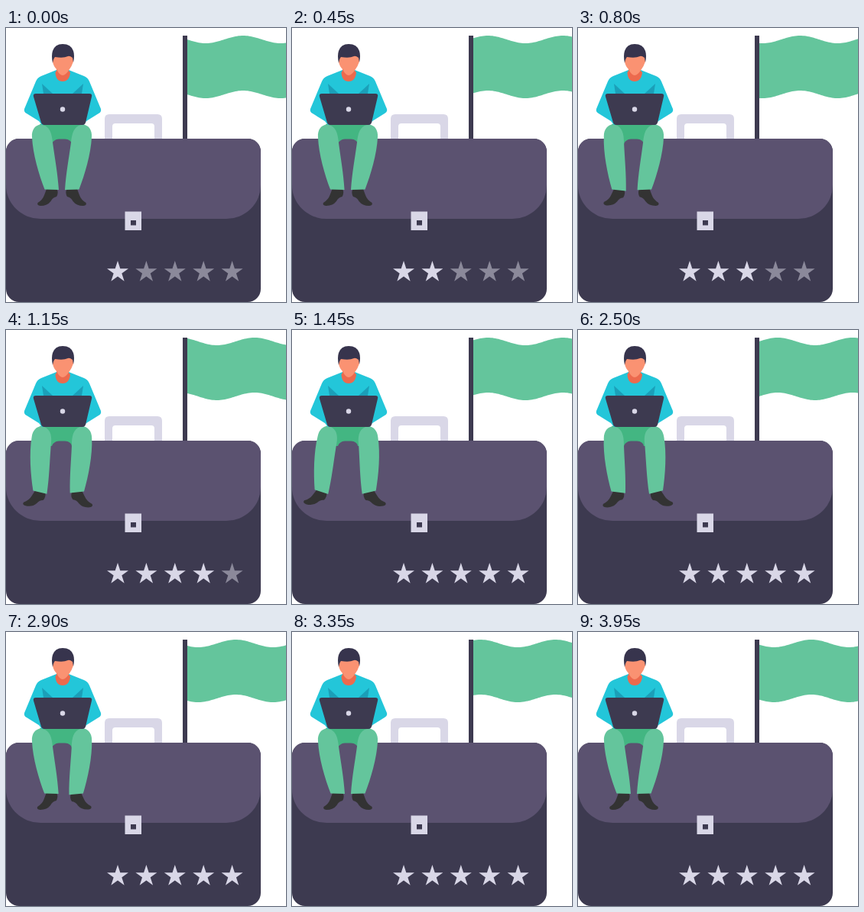
These frames come from a looping animation (366 by 359 pixels, 4000 ms). An HTML page:

```html
<!DOCTYPE html>
<html lang="en">
<head>
<meta charset="utf-8">
<title>Briefcase rating</title>
<style>
  html, body { margin: 0; width: 100%; height: 100%; overflow: hidden; background: #fff; }
  svg { display: block; width: 100vw; height: 100vh; }
  .dark { fill: #3d3a50; }
  .lid { fill: #5b5270; }
  .pale { fill: #d9d7e7; }
  .green { fill: #64c59c; }
  .thigh { fill: #43b682; }
  .shoe { fill: #333; }
  .shirt { fill: #23c6d9; }
  .fold { fill: #1b9fb8; }
  .skin { fill: #fa9272; }
  .neck { fill: #ec6a4e; }
  .hair { fill: #37344d; }
</style>
</head>
<body>
<svg viewBox="0 0 366 359">
  <defs>
    <g id="leg">
      <path class="shoe" d="M53 211H66.500Q69 216 66 221Q61 222 58.500 227Q54 233 45 233Q40 232.500 41.500 229Q48 225 50 219Z"/>
      <path class="green" d="M34 143C33 132 40 125 48 127C57 129 60 138 61 150C64 172 67.500 190 69 212L50.500 211.500C43 192 35 165 34 143Z"/>
    </g>
    <path id="fold" class="fold" d="M47 73L61 86H49Z"/>
  </defs>

  <path id="flag" class="green"/>
  <path class="dark" d="M231 10H237V146H231Z"/>
  <path class="pale" fill-rule="evenodd" d="M129 145V119Q129 113 135 113H198Q204 113 204 119V145H194V129Q194 125 190 125H143Q139 125 139 129V145Z"/>
  <rect class="dark" y="145" width="333" height="214" rx="17"/>
  <path class="lid" d="M0 162A17 17 0 0 1 17 145H316A17 17 0 0 1 333 162V206A45 44 0 0 1 288 250H45A45 44 0 0 1 0 206Z"/>
  <path class="pale" d="M155.500 240.500H177V265H155.500Z"/>
  <path class="dark" d="M163 252H170V258.500H163Z"/>
  <g id="stars"></g>

  <path class="thigh" d="M40 131Q44 124 52 124H94Q102 124 106 131L96 152H86Q85 146 77 145.500H69Q62 146 60 152H50Z"/>
  <use id="leftLeg" href="#leg"/>
  <g transform="matrix(-1 0 0 1 146 0)"><use id="rightLeg" href="#leg"/></g>

  <path class="shirt" d="M66 55L46 63Q41 65 39 70L24 106Q23 110 27 112L43 122L47 127H101L105 122L121 112Q125 110 124 106L109 70Q107 65 102 63L82 55Z"/>
  <use href="#fold"/>
  <use href="#fold" transform="matrix(-1 0 0 1 148 0)"/>
  <path class="neck" d="M66 52H82V56L84 58Q83 70 74 70Q65 70 64.500 58L66 56Z"/>
  <path class="skin" d="M61 36H88V44Q86 50 83 54Q78 62 74 62Q70 62 66 54Q62 50 61 44Z"/>
  <path class="hair" d="M61 46Q59 36 61 30Q64 21 74 21Q85 21 88 30Q90 36 88 45L87 39Q83 36 81 37Q75 40 64 38Q62 40 61 46Z"/>
  <path class="dark" d="M39 86H109Q113 86 112 90L104 124Q103 127 100 127H50Q47 127 46 124L36 90Q35 86 39 86Z"/>
  <circle class="pale" cx="74" cy="106.500" r="3.200"/>
</svg>
<script>
  const LOOP = 4000, STEP = 50, BEAT = 1000 / 3;
  const SWING = 18, KNEE = "48 140";
  const $ = id => document.getElementById(id);

  function starPoints(cx, cy, radius) {
    return Array.from({ length: 10 }, (_, i) => {
      const r = i % 2 ? radius * 0.382 : radius;
      const a = i * Math.PI / 5;
      return `${(cx + r * Math.sin(a)).toFixed(2)},${(cy - r * Math.cos(a)).toFixed(2)}`;
    }).join(" ");
  }

  const stars = Array.from({ length: 5 }, (_, i) => {
    const star = document.createElementNS("http://www.w3.org/2000/svg", "polygon");
    star.setAttribute("points", starPoints(146 + 37.4 * i, 319.8, 14.7));
    return $("stars").appendChild(star);
  });

  // The wave travels right by one wavelength per second.
  function flagPath(t) {
    const wave = x => 15 - 5 * Math.cos(2 * Math.PI * ((x - 310) / 98 - t / 1000));
    const top = [], bottom = [];
    for (let x = 236; x <= 368; x += 2) {
      const y = wave(x);
      top.push(`${x} ${y.toFixed(2)}`);
      bottom.unshift(`${x} ${(y + 72).toFixed(2)}`);
    }
    return `M${top.concat(bottom).join("L")}Z`;
  }

  // Out and back, four beats each way, eased at both ends.
  function swing(t, start) {
    const u = Math.min(Math.max((t - start) / (8 * BEAT), 0), 1);
    return SWING * (1 - Math.cos(2 * Math.PI * u)) / 2;
  }

  function render(t) {
    $("flag").setAttribute("d", flagPath(t));
    $("leftLeg").setAttribute("transform", `rotate(${swing(t, BEAT)} ${KNEE})`);
    $("rightLeg").setAttribute("transform", `rotate(${swing(t, 2 * BEAT)} ${KNEE})`);
    stars.forEach((star, i) => star.setAttribute("fill", t >= i * BEAT ? "#d9d7e7" : "#8b899a"));
  }

  const begin = performance.now();
  function tick() {
    const t = (performance.now() - begin) % LOOP;
    render(Math.floor(t / STEP) * STEP);
    requestAnimationFrame(tick);
  }
  tick();
</script>
</body>
</html>
```
